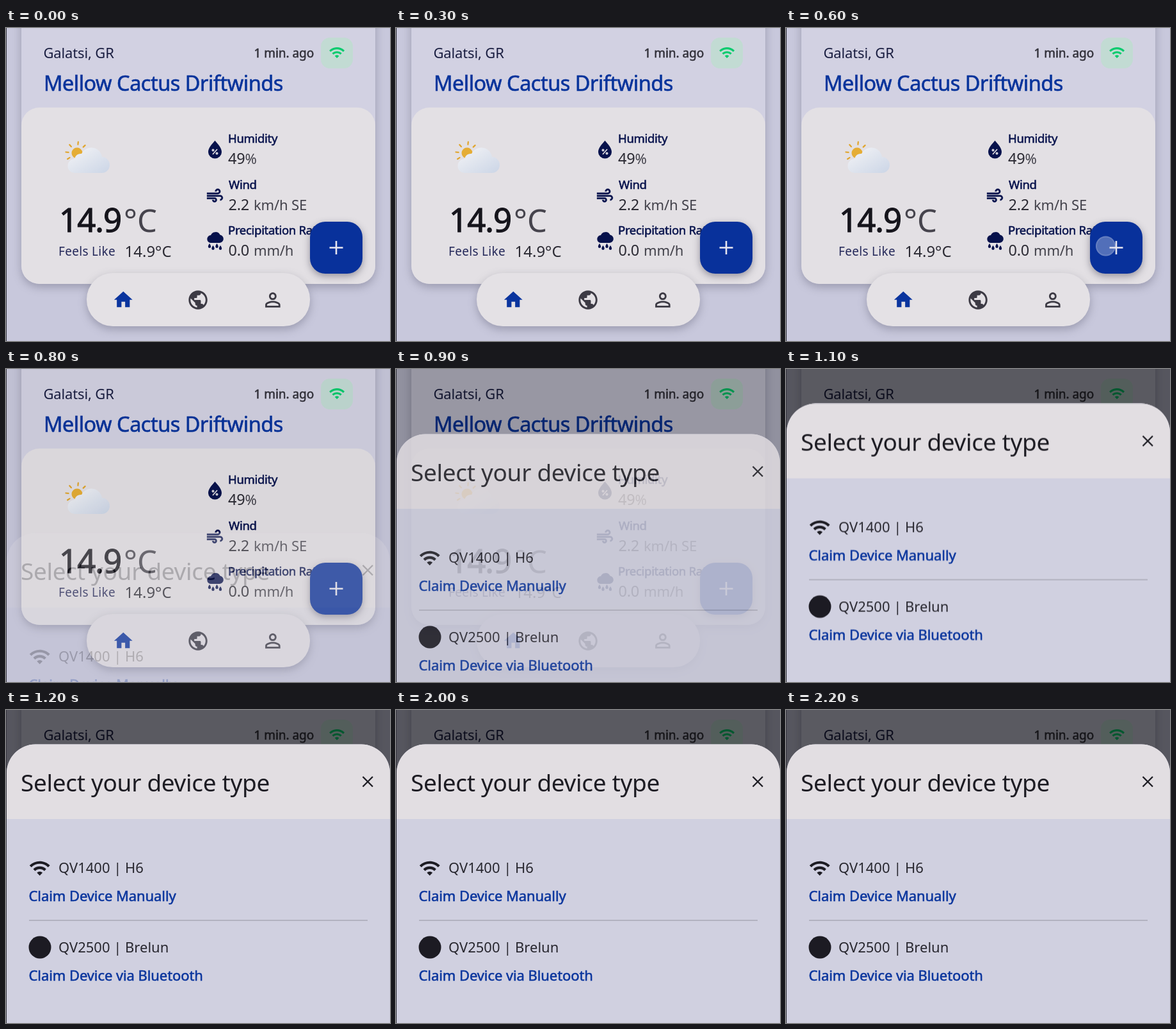
An HTML page that plays this animation: 600x488 px, repeating every 2400 ms.

```html
<!DOCTYPE html>
<html lang="en">
<head>
<meta charset="utf-8">
<title>Add a device</title>
<style>
  html, body { margin: 0; width: 100%; height: 100%; overflow: hidden; background: #c8c8dc; }
  svg { display: block; width: 600px; height: 488px; }
  text { font-family: "Noto Sans", "Open Sans", sans-serif; fill: #2b2a33; white-space: pre; }

  .medium { stroke: currentColor; stroke-width: .55px; }
  .place { font-size: 22px; letter-spacing: -.15px; fill: #191d40; }
  .ago { font-size: 19px; letter-spacing: -.05px; color: #33323b; fill: #33323b; }
  .station { font-size: 32.5px; letter-spacing: -.5px; color: #07339b; fill: #07339b; stroke-width: .6px; }
  .label { font-size: 18.5px; letter-spacing: -.3px; color: #07124c; fill: #07124c; }
  .value { font-size: 23.5px; letter-spacing: -.2px; }
  .unit { font-size: 22px; letter-spacing: -.15px; fill: #42414a; }
  .temp { font-size: 51px; letter-spacing: -1px; color: #16151c; fill: #16151c; stroke-width: 1.1px; }
  .degree { font-size: 49px; fill: #46444d; }
  .feels { font-size: 19px; letter-spacing: .3px; fill: #25295a; }
  .feels-value { font-size: 24px; }
  .heading { font-size: 37px; letter-spacing: -.33px; fill: #1d1c23; }
  .device { font-size: 22px; fill: #27262e; }
  .link { font-size: 22px; letter-spacing: -.08px; color: #0a359d; fill: #0a359d; }

  .soft { filter: drop-shadow(0 5px 7px rgba(60, 58, 80, .32)); }
  .lift { filter: drop-shadow(0 4px 6px rgba(40, 38, 60, .42)); }
  .navy { fill: #07124c; }

  .touch, .scrim, .sheet { animation: 2400ms step-end infinite; }
  .touch { animation-name: touch; }
  .scrim { animation-name: scrim; }
  .sheet { animation-name: sheet; }

  @keyframes touch {
    0%, 29.1667%, 100% { opacity: 0; }
    20.8333% { opacity: .5; }
    25% { opacity: 1; }
  }
  @keyframes scrim {
    0%, 100% { opacity: 0; }
    29.1667% { opacity: .01; }
    33.3333% { opacity: .04; }
    37.5% { opacity: .28; }
    41.6667% { opacity: .53; }
    45.8333%, 50% { opacity: .57; }
  }
  @keyframes sheet {
    0%, 100% { opacity: 0; transform: translateY(440px); }
    29.1667% { opacity: .05; transform: translateY(400px); }
    33.3333% { opacity: .25; transform: translateY(202px); }
    37.5% { opacity: .83; transform: translateY(48px); }
    41.6667% { opacity: .98; transform: translateY(3px); }
    45.8333% { opacity: 1; transform: translateY(.5px); }
    50% { opacity: 1; transform: none; }
  }
</style>
</head>
<body>
<svg viewBox="0 0 600 488">
  <defs>
    <path id="wifi" d="M1 9l2 2c4.97-4.97 13.03-4.97 18 0l2-2C16.93 2.93 7.08 2.93 1 9zm8 8l3 3 3-3c-1.65-1.66-4.34-1.66-6 0zm-4-4l2 2c2.76-2.76 7.24-2.76 10 0l2-2C15.14 9.14 8.87 9.14 5 13z"/>
    <path id="drip" d="M0-4C1.2-2.2 2.2-.8 2.2.8a2.2 2.2 0 0 1-4.4 0C-2.2-.8-1.2-2.2 0-4z"/>
    <path id="ray" d="M0-13.5V-17.5"/>
    <linearGradient id="cloud" x1="0" y1="0" x2="1" y2="1">
      <stop offset=".2" stop-color="#eceef3"/>
      <stop offset="1" stop-color="#cbd5e6"/>
    </linearGradient>
  </defs>

  <rect width="600" height="488" fill="#c8c8dc"/>

  <!-- Station card -->
  <rect class="soft" x="24" y="-40" width="553" height="439" rx="28" fill="#d2d1e2"/>
  <rect x="24" y="124" width="553" height="275" rx="28" fill="#e3e0e4"/>
  <text class="place" x="58.5" y="47">Galatsi, GR</text>
  <text class="ago medium" x="387.5" y="46">1 min. ago</text>
  <rect x="492" y="15" width="50" height="48" rx="14" fill="#c2dbd3"/>
  <use href="#wifi" transform="translate(504 25.2) scale(1.09)" fill="#08cb6d"/>
  <text class="station medium" x="59" y="98">Mellow Cactus Driftwinds</text>

  <!-- Conditions -->
  <g transform="translate(111 195)">
    <circle r="8.5" fill="#e5ad35"/>
    <g stroke="#e0a52c" stroke-width="2.2" stroke-linecap="round">
      <use href="#ray" transform="rotate(-85)"/>
      <use href="#ray" transform="rotate(-42)"/>
      <use href="#ray" transform="rotate(6)"/>
      <use href="#ray" transform="rotate(46)"/>
      <use href="#ray" transform="rotate(-122)"/>
    </g>
  </g>
  <path d="M108 226a11 11 0 0 1-1-22 10 10 0 0 1 11-8 17 17 0 0 1 32 5 12.5 12.5 0 0 1-1 25z" fill="url(#cloud)"/>
  <text class="temp medium" x="83" y="318">14.9</text>
  <text class="degree" x="184" y="318">°C</text>
  <text class="feels" x="82" y="355">Feels Like</text>
  <text class="feels-value" x="185.500" y="357">14.9°C</text>

  <g transform="translate(326.5 193)">
    <path class="navy" d="M0-17.5C5-11.5 10.5-6 10.5.5a10.5 10 0 0 1-21 0C-10.5-6-5-11.5 0-17.5z"/>
    <g fill="none" stroke="#e3e0e4" stroke-width="1.6">
      <path d="M3.5-4L-3.5 4"/>
      <circle cx="-3" cy="-2.5" r="1.2"/>
      <circle cx="3" cy="2.5" r="1.2"/>
    </g>
  </g>
  <path class="navy" transform="translate(311.5 246.7) scale(1.25)" stroke="#07124c" stroke-width=".25" d="M14.5 17c0 1.65-1.35 3-3 3s-3-1.35-3-3h2c0 .55.45 1 1 1s1-.45 1-1-.45-1-1-1H2v-2h9.5c1.65 0 3 1.35 3 3zM19 6.5C19 4.57 17.43 3 15.5 3S12 4.57 12 6.5h2c0-.83.67-1.5 1.5-1.5s1.5.67 1.5 1.5S16.33 8 15.5 8H2v2h13.5c1.93 0 3.5-1.57 3.5-3.5zm-.5 4.5H2v2h16.5c.83 0 1.5.67 1.5 1.5s-.67 1.5-1.5 1.5v2c1.93 0 3.5-1.57 3.5-3.5S20.43 11 18.5 11z"/>
  <g class="navy">
    <path d="M320.5 335a6 6 0 0 1-.5-12 8 8 0 0 1 14.5-.5 6.3 6.3 0 0 1-.5 12.5z"/>
    <use href="#drip" x="318" y="340"/>
    <use href="#drip" x="323.5" y="343"/>
    <use href="#drip" x="329.5" y="340"/>
    <use href="#drip" x="335" y="343"/>
  </g>

  <text class="label medium" x="347" y="179">Humidity</text>
  <text class="value" x="347" y="212">49<tspan class="unit">%</tspan></text>
  <text class="label medium" x="348" y="251">Wind</text>
  <text class="value" x="347.5" y="284">2.2<tspan class="unit" x="387">km/h SE</tspan></text>
  <text class="label medium" x="347" y="322">Precipitation Rate</text>
  <text class="value" x="347.5" y="355">0.0<tspan class="unit" x="387">mm/h</tspan></text>

  <!-- Navigation -->
  <rect class="soft" x="126" y="382" width="349" height="83" rx="41" fill="#e4e1e5"/>
  <path transform="translate(166 406.5) scale(1.44)" fill="#0a349e" d="M10 20v-6h4v6h5v-8h3L12 3 2 12h3v8z"/>
  <g fill="#3c3a44">
    <path transform="translate(282.4 406.4) scale(1.47)" d="M12 2C6.48 2 2 6.48 2 12s4.48 10 10 10 10-4.48 10-10S17.52 2 12 2zm-1 17.93c-3.95-.49-7-3.85-7-7.93 0-.62.08-1.21.21-1.79L9 15v1c0 1.1.9 2 2 2v1.93zm6.9-2.54c-.26-.81-1-1.39-1.9-1.39h-1v-3c0-.55-.45-1-1-1H8v-2h2c.55 0 1-.45 1-1V7h2c1.1 0 2-.9 2-2v-.41c2.93 1.19 5 4.06 5 7.41 0 2.08-.8 3.97-2.1 5.39z"/>
    <path transform="translate(399.2 406.4) scale(1.47)" d="M12 5.9c1.16 0 2.1.94 2.1 2.1s-.94 2.1-2.1 2.1S9.9 9.16 9.9 8s.94-2.1 2.1-2.1m0 9c2.97 0 6.1 1.46 6.1 2.1v1.1H5.9V17c0-.64 3.13-2.1 6.1-2.1M12 4C9.79 4 8 5.79 8 8s1.79 4 4 4 4-1.79 4-4-1.79-4-4-4zm0 9c-2.67 0-8 1.34-8 4v3h16v-3c0-2.66-5.33-4-8-4z"/>
  </g>

  <!-- Add button -->
  <rect class="lift" x="475" y="302" width="82" height="81" rx="24" fill="#08319b"/>
  <g class="touch">
    <circle cx="499.5" cy="340" r="15.5" fill="#fff" opacity=".3"/>
    <circle cx="499.5" cy="340" r="14.5" fill="none" stroke="#fff" stroke-width="2" opacity=".12"/>
  </g>
  <path d="M505.5 342.5h21M516 332v21" stroke="#e8e6f0" stroke-width="2.6"/>

  <rect class="scrim" width="600" height="488" fill="#000"/>

  <!-- Device picker -->
  <g class="sheet">
    <path d="M1 500V98.5a45 45 0 0 1 45-45H555a45 45 0 0 1 45 45V500z" fill="#d0d0e0"/>
    <path d="M1 170V98.5a45 45 0 0 1 45-45H555a45 45 0 0 1 45 45V170z" fill="#e2dee2"/>
    <text class="heading" x="23" y="127">Select your device type</text>
    <path d="M557.5 104l15.5 15.5M573 104l-15.5 15.5" stroke="#1d1c23" stroke-width="2.3"/>

    <use href="#wifi" transform="translate(35.3 229.2) scale(1.45)" fill="#1d1c23"/>
    <text class="device" x="82" y="254">QV1400 | H6</text>
    <text class="link medium" x="35.5" y="298">Claim Device Manually</text>
    <path d="M36 328H565" stroke="#a9a8b6" stroke-width="1.6"/>

    <circle cx="53" cy="370" r="17.5" fill="#1c1b23"/>
    <text class="device" x="82" y="378">QV2500 | Brelun</text>
    <text class="link medium" x="35.5" y="422">Claim Device via Bluetooth</text>
  </g>

  <rect width="1" height="488" fill="#34333d"/>
</svg>
</body>
</html>
```
